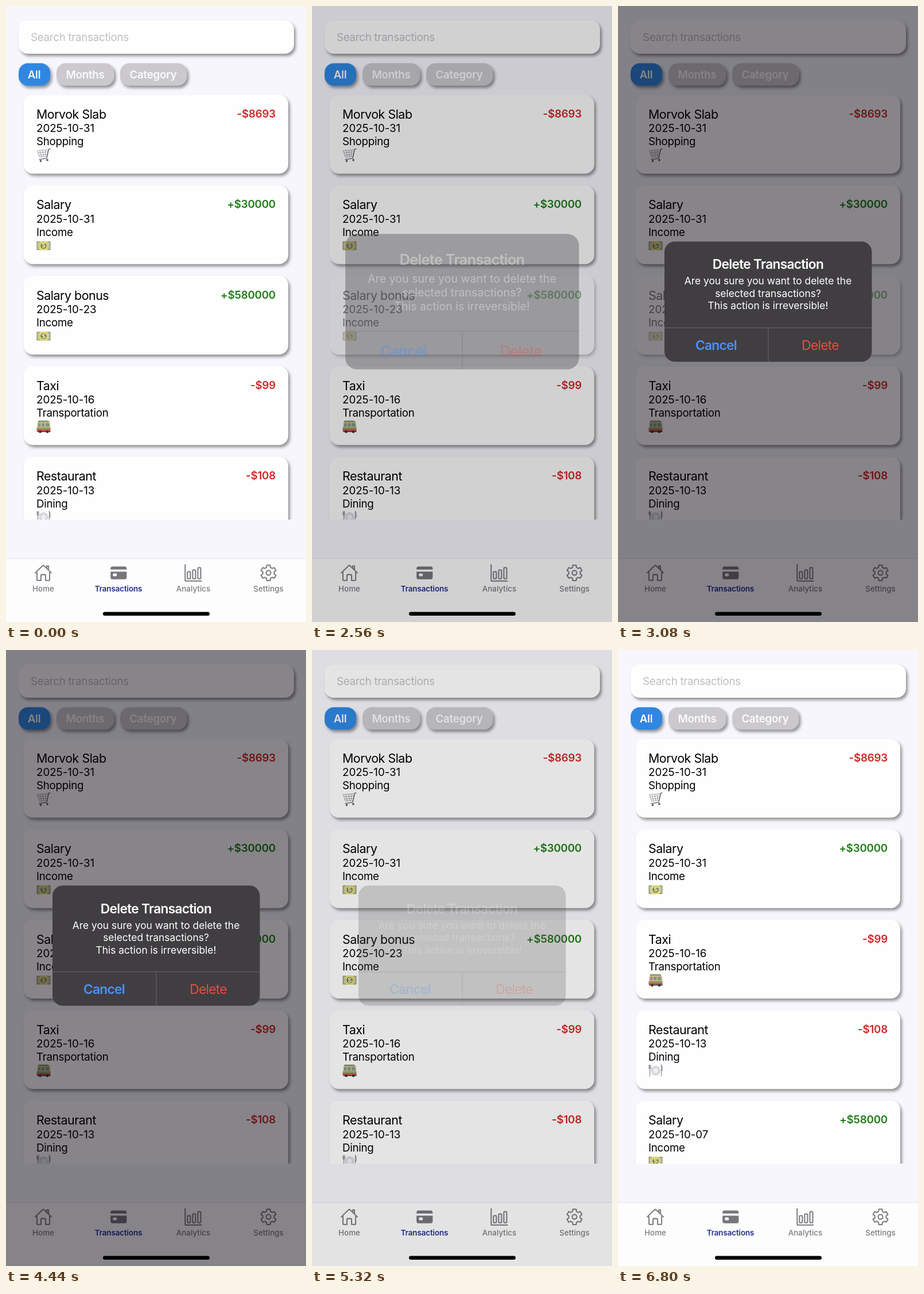
Write an HTML page that moves like this. It is 523 px wide and 1071 px high and loops after 7040 ms.

```html
<!DOCTYPE html>
<html lang="en">
<head>
<meta charset="utf-8">
<title>Transactions</title>
<style>
html, body { margin: 0; width: 100%; height: 100%; overflow: hidden; background: #f6f6fc; }
svg { display: block; width: 523px; height: 1071px; font-family: Inter, Roboto, sans-serif; font-size: 18.8px; letter-spacing: -.3px; }
.box { filter: drop-shadow(3.5px 4px 2.8px rgba(0, 0, 0, .4)); }
.title { font-size: 21.45px; letter-spacing: -.5px; }
.date { letter-spacing: -.05px; }
.bold { font-weight: 600; letter-spacing: -.25px; }
.end { text-anchor: end; }
.mid { text-anchor: middle; }
.tab { font-size: 13.4px; font-weight: 500; letter-spacing: 0; fill: #7c7c80; }
.on { font-weight: 600; letter-spacing: -.12px; fill: #232d96; }
.icon { fill: none; stroke: #7c7c80; stroke-width: 32; stroke-linejoin: round; stroke-linecap: round; }
.head { font-size: 22.8px; letter-spacing: -.75px; }
.body { font-size: 17.4px; letter-spacing: 0; }
#alert > * { opacity: var(--shown); }
</style>
</head>
<body>
<svg viewBox="0 0 523 1071">
  <defs>
    <clipPath id="list"><rect x="22" y="144" width="478" height="749"/></clipPath>
    <g id="cart" fill="none" stroke="#98989e" stroke-width=".9" stroke-linejoin="round">
      <path d="M1 4 20.500 2.500 18 14 5 15.500ZM2 8 19.500 6M3.500 12 19 10M5.500 4 8.500 15M10.500 3.500 12 14.500M15.500 3 15 14"/>
      <path d="M24 1 21 1.500 17.500 17.500 4 19.500" stroke="#5e5e64" stroke-width="1.300"/>
      <g fill="#5a5a60" stroke="none"><circle cx="7" cy="22" r="1.800"/><circle cx="18.500" cy="20.500" r="1.800"/></g>
    </g>
    <g id="cash">
      <rect y="4.500" width="24" height="15" rx=".8" fill="#8d956d"/>
      <rect x="1.500" y="6" width="21" height="12" fill="#c3c99e"/>
      <path d="M5 4.500h14v15H5z" fill="#e4d873"/>
      <circle cx="12" cy="12" r="5.200" fill="#6e7950"/>
      <text x="12" y="15.800" class="mid" font-size="11" font-weight="700" fill="#f3efc0">$</text>
    </g>
    <g id="van">
      <path d="M4 2H20Q23 2 23.500 7L24 19H1V9Q1 2 4 2Z" fill="#dfc878"/>
      <path d="M3 1.500H20L22 4.500H2Z" fill="#8a9873"/>
      <path d="M3 6H7V12H2ZM8.500 6H14V12H8.500ZM15.500 6H21.500L22.500 12H15.500Z" fill="#7d949c"/>
      <path d="M0 13H24V16H0Z" fill="#8bab6c"/>
      <path d="M0 16H24V20H0Z" fill="#c65a4a"/>
      <path d="M1 19.500H24V21.500H1Z" fill="#4a4a4e"/>
      <circle cx="6" cy="21" r="2.300" fill="#333"/><circle cx="18.500" cy="21" r="2.300" fill="#333"/>
    </g>
    <g id="plate">
      <circle cx="12" cy="12" r="8.600" fill="#dadae0"/>
      <circle cx="12" cy="12" r="5.300" fill="#ececf1" stroke="#c5c5cc"/>
      <path d="M.5 2V7Q.5 9 2 9T3.500 7V2M2 2V22M22 22V2Q24 4 23.500 12H22" fill="none" stroke="#8d8d94" stroke-width="1.200"/>
    </g>
  </defs>

  <rect width="523" height="1071" fill="#f6f6fc"/>
  <rect class="box" x="22" y="25" width="480" height="58" rx="16" fill="#fefefe"/>
  <text x="43" y="61" fill="#bfbfc4">Search transactions</text>
  <g class="bold mid" fill="#fafafc">
    <rect class="box" x="22" y="99.500" width="55" height="39" rx="16" fill="#2f87e2"/>
    <text x="49" y="125.500">All</text>
    <rect class="box" x="88" y="99.500" width="100.500" height="39" rx="16" fill="#cbc9cd"/>
    <text x="138" y="125.500">Months</text>
    <rect class="box" x="199" y="99.500" width="116.500" height="39" rx="16" fill="#cbc9cd"/>
    <text x="256.500" y="125.500">Category</text>
  </g>
  <g id="cards" clip-path="url(#list)"></g>

  <rect y="960" width="523" height="111" fill="#fdfdfe"/>
  <path d="M0 960.500H523" stroke="#e0e0e6"/>
  <g class="icon">
    <path transform="translate(48.900 969.500) scale(.0629)" d="M80 212V448a16 16 0 0 0 16 16h96V328a24 24 0 0 1 24-24h80a24 24 0 0 1 24 24v136h96a16 16 0 0 0 16-16V212M480 256 267 52q-11-8-22 0L32 256M400 179V64h-48v69"/>
    <g transform="translate(310.300 969.500) scale(.0629)">
      <path d="M32 32V464a16 16 0 0 0 16 16H480"/>
      <rect x="96" y="224" width="80" height="192" rx="20"/>
      <rect x="240" y="176" width="80" height="240" rx="20"/>
      <rect x="384" y="112" width="80" height="304" rx="20"/>
    </g>
    <g transform="translate(457.600 985.600) scale(.0629)"><path id="gear"/><circle r="64"/></g>
  </g>
  <g transform="translate(180.200 969.500) scale(.0629)" fill="#77777b">
    <path d="M32 222H480V376a56 56 0 0 1-56 56H88a56 56 0 0 1-56-56ZM32 162V136a56 56 0 0 1 56-56H424a56 56 0 0 1 56 56V162Z"/>
    <rect x="98" y="270" width="108" height="80" rx="30" fill="#fdfdfe"/>
  </g>
  <g class="tab mid">
    <text x="65" y="1017.500">Home</text>
    <text class="on" x="196" y="1017.500">Transactions</text>
    <text x="326.500" y="1017.500">Analytics</text>
    <text x="457.500" y="1017.500">Settings</text>
  </g>

  <rect id="dim" width="523" height="1071" fill="#050009"/>
  <rect x="169" y="1053.500" width="186" height="6.500" rx="3.250"/>

  <g id="alert" class="mid" fill="#fff">
    <rect x="81" y="409.500" width="361.500" height="209" rx="18" fill="#403e41"/>
    <path d="M81 559.500H442.500M262 559.500V618.500" stroke="#69676a"/>
    <text class="bold head" x="261.500" y="457.500">Delete Transaction</text>
    <g class="body">
      <text x="261.500" y="484.500">Are you sure you want to delete the</text>
      <text x="261.500" y="506">selected transactions?</text>
      <text x="261.500" y="527.500">This action is irreversible!</text>
    </g>
    <text class="bold head" x="171" y="598" fill="#4b91f5">Cancel</text>
    <text class="head" x="352.500" y="598" fill="#eb4b41">Delete</text>
  </g>
</svg>
<script>
const LOOP = 7040, PRESS = 2000, OPEN = 2505, RELEASE = 3150, CLOSE = 5193, REMOVE = 5520;
const TOP = 154.4, PITCH = 157.3, PICKED = 2;
const items = [
  ['Morvok Slab', '2025-10-31', 'Shopping', '-$8693', 'cart'],
  ['Salary', '2025-10-31', 'Income', '+$30000', 'cash'],
  ['Salary bonus', '2025-10-23', 'Income', '+$580000', 'cash'],
  ['Taxi', '2025-10-16', 'Transportation', '-$99', 'van'],
  ['Restaurant', '2025-10-13', 'Dining', '-$108', 'plate'],
  ['Salary', '2025-10-07', 'Income', '+$58000', 'cash']
];

const $ = id => document.getElementById(id);

const cards = items.map(([title, date, kind, amount, icon]) => {
  const g = document.createElementNS('http://www.w3.org/2000/svg', 'g');
  g.innerHTML = `<rect class="box" x="31" width="461" height="137" rx="16" fill="#fefefe"/>
    <text class="title" x="53" y="41.500">${title}</text>
    <text class="date" x="53" y="65">${date}</text>
    <text x="53" y="88">${kind}</text>
    <text class="bold end" x="470" y="39.500" fill="${amount[0] === '-' ? '#d22828' : '#217d19'}">${amount}</text>
    <use href="#${icon}" x="53.500" y="93"/>`;
  return $('cards').appendChild(g);
});

// Six flat-topped teeth, the first one pointing up.
const tooth = [[-20, 160], [-12.5, 217], [12.5, 217], [20, 160]];
const gear = [0, 60, 120, 180, 240, 300].flatMap(turn => tooth.map(([deg, r]) => {
  const a = (turn + deg) * Math.PI / 180;
  return `${(r * Math.sin(a)).toFixed(1)} ${(-r * Math.cos(a)).toFixed(1)}`;
}));
$('gear').setAttribute('d', `M${gear.join('L')}Z`);

// Critically damped spring, from 0 to 1.
const spring = ms => {
  const x = Math.max(0, ms) * .02285;
  return 1 - (1 + x) * Math.exp(-x);
};
const easeInOut = x => x < .5 ? 2 * x * x : 1 - 2 * (1 - x) ** 2;

function draw(t) {
  const shown = t < CLOSE ? spring(t - OPEN) : 1 - spring(t - CLOSE);
  const release = Math.max(0, Math.min(1, (t - RELEASE) / 250));
  const removed = t >= REMOVE;

  cards.forEach((card, i) => {
    const slot = removed && i > PICKED ? i - 1 : i;
    card.setAttribute('transform', `translate(0 ${TOP + slot * PITCH})`);
  });
  const picked = cards[PICKED].style;
  picked.display = removed ? 'none' : '';
  picked.opacity = t < PRESS ? 1 : .5 + .5 * easeInOut(release);

  $('dim').style.opacity = .48 * shown;

  const scale = t < CLOSE ? 1.2 - .2 * shown : 1;
  $('alert').style.setProperty('--shown', shown);
  $('alert').setAttribute('transform', `translate(261.5 514) scale(${scale}) translate(-261.5 -514)`);
}

function tick() {
  draw(performance.now() % LOOP);
  requestAnimationFrame(tick);
}
tick();
</script>
</body>
</html>
```
